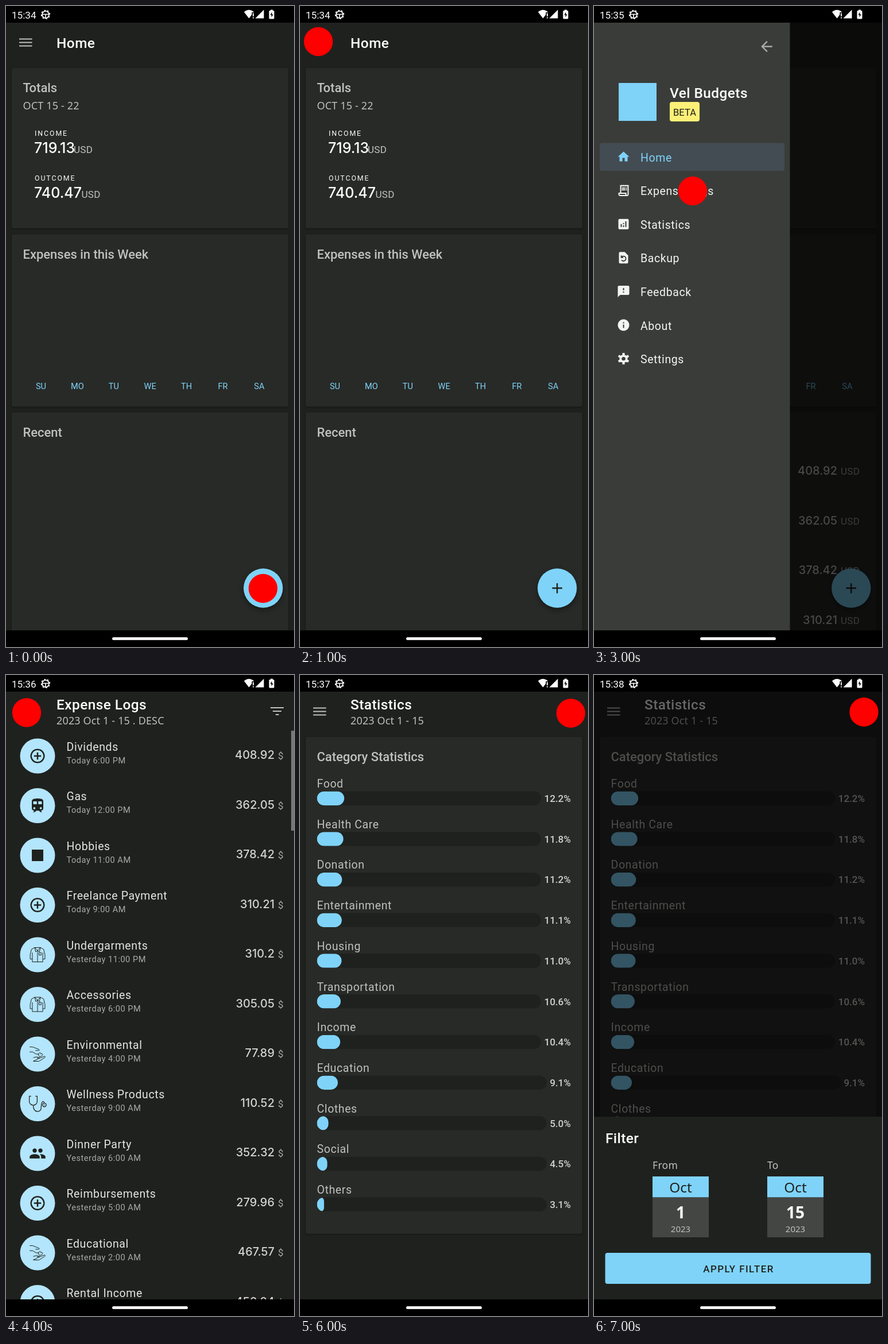
An HTML page with a canvas that plays this animation: 502x1116 px, repeating every 8 s.

```html
<!DOCTYPE html>
<html lang="en">
<head>
<meta charset="utf-8">
<style>
  html, body { margin: 0; width: 100%; height: 100%; overflow: hidden; background: #000; }
  canvas { display: block; }
</style>
</head>
<body>
<canvas id="stage" width="502" height="1116"></canvas>
<script>
const ctx = document.getElementById('stage').getContext('2d');
const BG = '#1f211e', CARD = '#282a27', DRAWER = '#3a3c39', BLUE = '#7fd3f9', PALE = '#b3e5fc';
const WHITE = '#fff', SOFT = '#e4e5e2', GREY = '#c0c1be', DIM = '#a9aaa7';

// Text styles: font and letter spacing
const roboto = (px, weight = 400) => `${weight} ${px}px Roboto, sans-serif`;
const noto = (px, weight = 400) => `${weight} ${px}px "Noto Sans", sans-serif`;
const inter = px => `500 ${px}px Inter, sans-serif`;
const STYLE = {
  clock: [roboto(17.1), 0],
  title: [roboto(24.4, 500), 0.45],
  heading: [roboto(22, 500), -0.03],
  body: [roboto(19.5), 0.6],
  caption: [roboto(14.6), 0.5],
  day: [roboto(14.6), 0],
  unit: [roboto(17.1), 0.2],
  overline: [roboto(12.4), 1.9],
  percent: [roboto(17, 500), 0],
  button: [roboto(17, 500), 1.4],
  badge: [roboto(16.6), 0],
  range: [noto(18), 0.15],
  label: [noto(17.5), 0.3],
  month: [noto(24.4), 0],
  date: [noto(28, 700), 0],
  year: [noto(15), 0],
  total: [inter(25), 0],
  amount: [inter(20), 0]
};

// 24-unit icons: f = filled path, s = stroked path, w = line width
const ICONS = {
  plus: { s: 'M12 3a9 9 0 1 0 .01 0zM12 7v10M7 12h10', w: 2 },
  train: { f: 'M12 2C8 2 4 2.5 4 6v9.5A3.5 3.5 0 0 0 7.5 19L6 20.5v.5h2.2l2-2H14l2 2h2v-.5L16.5 19a3.5 3.5 0 0 0 3.5-3.5V6c0-3.5-3.58-4-8-4zM7.5 17a1.5 1.5 0 1 1 .01 0zM11 10H6V6h5zM16.5 17a1.5 1.5 0 1 1 .01 0zM18 10h-5V6h5z' },
  square: { f: 'M4 4h16v16H4z' },
  jacket: { s: 'M8 2L3.5 4.5 1.7 12v6h3v4h14.6v-4h3v-6L20.5 4.5 16 2H8l4 4 4-4M12 6v16M4.7 18V9M19.3 18V9M14 9h3v3.5h-3zM12 6L9.5 8 8 2M12 6l2.5 2L16 2', w: 0.8 },
  hands: { s: 'M1 2h4l9 3.5c1 .7.5 1.5-.5 1.5H9M1 9h4l5 3h4M14 11c1-2 3-1 2.5 1 1.5-1.5 3.5 0 2 2L15 16l-2-3zM6 17l5-1.2 4 1.7h-4M15 17.5l7-2.5c1.2.5.5 1.7-.5 2.2L14 22H6z', w: 0.8 },
  stethoscope: { s: 'M3 1.5H.5v7a5.5 5.5 0 0 0 11 0v-7H9M6 14c0 12 11 10 11 4 0-7 2-12 4.5-7.5M21.5 11a2.6 2.6 0 1 0 .01 0zM21.5 13v1.4', w: 1 },
  people: { f: 'M16 11a3 3 0 1 0-.01 0zM8 11a3 3 0 1 0-.01 0zM8 13c-2.33 0-7 1.17-7 3.5V19h14v-2.5c0-2.33-4.67-3.5-7-3.5zM16 13l-1 .05c1.2.85 2 2 2 3.45V19h6v-2.5c0-2.33-4.67-3.5-7-3.5z' },
  home: { f: 'M10 20v-6h4v6h5v-8h3L12 3 2 12h3v8z' },
  receipt: { f: 'M19.5 3.5L18 2l-1.5 1.5L15 2l-1.5 1.5L12 2l-1.5 1.5L9 2 7.5 3.5 6 2v14H3v3c0 1.66 1.34 3 3 3h12c1.66 0 3-1.34 3-3V2zM15 20H6c-.55 0-1-.45-1-1v-1h10zM19 19c0 .55-.45 1-1 1s-1-.45-1-1v-3H8V5h11zM9 7h6v2H9zM16 7h2v2h-2zM9 10h6v2H9zM16 10h2v2h-2z' },
  chart: { f: 'M19 3H5a2 2 0 0 0-2 2v14a2 2 0 0 0 2 2h14a2 2 0 0 0 2-2V5a2 2 0 0 0-2-2zM9 17H7v-5h2zM13 17h-2v-3h2zM13 12h-2v-2h2zM17 17h-2V7h2z' },
  backup: { f: 'M14 2H6a2 2 0 0 0-2 2v16c0 1.1.9 2 2 2h12a2 2 0 0 0 2-2V8z', cut: 'M8.5 16a4.2 4.2 0 1 0 0-5M8 8v3.5h3.5', w: 1.8 },
  feedback: { f: 'M20 2H4a2 2 0 0 0-2 2v18l4-4h14a2 2 0 0 0 2-2V4a2 2 0 0 0-2-2zM13 14h-2v-2h2zM13 10h-2V6h2z' },
  info: { f: 'M12 2a10 10 0 1 0 .01 0zM13 17h-2v-6h2zM13 9h-2V7h2z' },
  gear: { s: 'M12 7a5 5 0 1 0 .01 0zM12 2v5M12 17v5M3.3 7l4.4 2.5M16.3 14.5l4.4 2.5M3.3 17l4.4-2.5M16.3 9.5L20.7 7', w: 4 },
  back: { f: 'M20 11H7.83l5.59-5.59L12 4l-8 8 8 8 1.41-1.41L7.83 13H20z' }
};

const ENTRIES = [
  ['Dividends', 'Today 6:00 PM', '408.92', 'plus'],
  ['Gas', 'Today 12:00 PM', '362.05', 'train'],
  ['Hobbies', 'Today 11:00 AM', '378.42', 'square'],
  ['Freelance Payment', 'Today 9:00 AM', '310.21', 'plus'],
  ['Undergarments', 'Yesterday 11:00 PM', '310.2', 'jacket'],
  ['Accessories', 'Yesterday 6:00 PM', '305.05', 'jacket'],
  ['Environmental', 'Yesterday 4:00 PM', '77.89', 'hands'],
  ['Wellness Products', 'Yesterday 9:00 AM', '110.52', 'stethoscope'],
  ['Dinner Party', 'Yesterday 6:00 AM', '352.32', 'people'],
  ['Reimbursements', 'Yesterday 5:00 AM', '279.96', 'plus'],
  ['Educational', 'Yesterday 2:00 AM', '467.57', 'hands'],
  ['Rental Income', 'Yesterday 1:00 AM', '456.24', 'plus']
];
const SHARES = [
  ['Food', 12.2], ['Health Care', 11.8], ['Donation', 11.2], ['Entertainment', 11.1],
  ['Housing', 11], ['Transportation', 10.6], ['Income', 10.4], ['Education', 9.1],
  ['Clothes', 5], ['Social', 4.5], ['Others', 3.1]
];
const MENU = [
  ['Home', 'home'], ['Expense Logs', 'receipt'], ['Statistics', 'chart'], ['Backup', 'backup'],
  ['Feedback', 'feedback'], ['About', 'info'], ['Settings', 'gear']
];

function text(str, x, y, style, color = GREY, align = 'left') {
  const [font, spacing] = STYLE[style];
  ctx.font = font;
  ctx.letterSpacing = spacing + 'px';
  ctx.textAlign = align;
  ctx.fillStyle = color;
  ctx.fillText(str, x, y);
}

function box(x, y, w, h, color, r = 0) {
  ctx.fillStyle = color;
  ctx.beginPath();
  ctx.roundRect(x, y, w, h, r);
  ctx.fill();
}

function disc(x, y, r, color) {
  ctx.fillStyle = color;
  ctx.beginPath();
  ctx.arc(x, y, r, 0, 7);
  ctx.fill();
}

function stroke(d, color, width) {
  ctx.strokeStyle = color;
  ctx.lineWidth = width;
  ctx.stroke(new Path2D(d));
}

function fill(d, color) {
  ctx.fillStyle = color;
  ctx.fill(new Path2D(d), 'evenodd');
}

function icon(name, x, y, scale, color) {
  const { f, s, cut, w } = ICONS[name];
  ctx.save();
  ctx.translate(x, y);
  ctx.scale(scale, scale);
  ctx.translate(-12, -12);
  if (f) fill(f, color);
  if (s) stroke(s, color, w);
  if (cut) stroke(cut, DRAWER, w);
  ctx.restore();
}

function shadowed(blur, drop, draw) {
  ctx.save();
  ctx.shadowColor = 'rgba(0,0,0,.4)';
  ctx.shadowBlur = blur;
  ctx.shadowOffsetY = drop;
  draw();
  ctx.restore();
}

const card = (y, h) => shadowed(3, 1, () => box(10, y, 482, h, CARD, 3));
const shade = alpha => box(0, 29, 502, 1058, `rgba(0,0,0,${alpha})`);

function header(title, subtitle, filter) {
  stroke('M23 57.5h22.5M23 63.5h22.5M23 69.5h22.5', GREY, 2.2);
  text(title, 88, subtitle ? 60 : 73, 'title', WHITE);
  if (subtitle) text(subtitle, 88, 86, 'range');
  if (filter) stroke('M461 57h23M465 63h15M470 69h5.5', GREY, 2.2);
}

function entry([name, when, amount, glyph], y, o) {
  disc(o.cx, y, o.r, PALE);
  icon(glyph, o.cx, y, o.scale, BG);
  text(name, o.x, y - 2 - o.lift, 'body', o.color);
  text(when, o.x, y + 20 - o.lift, 'caption', o.sub);
  text(amount, o.right, y + 7 - o.lift / 4, 'amount', '#d2d3d0', 'right');
  text(o.unit, o.right + 6, y + 7 - o.lift / 4, 'unit', DIM);
}
const RECENT = { cx: 72.5, r: 33.5, scale: 1.5, x: 126, lift: 0, right: 424, unit: 'USD', color: GREY, sub: GREY };
const LOG = { cx: 55, r: 30.5, scale: 1.25, x: 105.5, lift: 7.5, right: 468, unit: '$', color: SOFT, sub: DIM };

function home(loaded) {
  header('Home');
  card(108, 279);
  text('Totals', 29.5, 150, 'heading');
  text('OCT 15 - 22', 29.5, 180, 'range');
  text('INCOME', 50, 225.5, 'overline', WHITE);
  text('719.13', 49, 256, 'total', WHITE);
  text('USD', 118, 256, 'unit');
  text('OUTCOME', 50, 303.5, 'overline', WHITE);
  text('740.47', 49, 334, 'total', WHITE);
  text('USD', 131.5, 334, 'unit');

  card(397.5, 300);
  text('Expenses in this Week', 29.5, 440, 'heading');
  ['SU', 'MO', 'TU', 'WE', 'TH', 'FR', 'SA'].forEach((day, i) =>
    text(day, 61 + i * 63.4, 667, 'day', BLUE, 'center'));

  card(707.5, 400);
  text('Recent', 29.5, 750, 'heading');
  if (loaded) {
    text('OCT 15 - 22', 29.5, 470, 'range');
    disc(61, 497, 2.5, BLUE);
    ctx.setLineDash([2.5, 3.6]);
    stroke('M61 501V637', BLUE, 1.2);
    ctx.setLineDash([]);
    ENTRIES.slice(0, 4).forEach((e, i) => entry(e, 809 + i * 86.5, RECENT));
  }
  shadowed(9, 4, () => disc(448.3, 1013.5, 34.2, BLUE));
  stroke('M439.5 1013.5h17.5M448.2 1005v17.5', BG, 2.4);
}

function logs(scrollbar) {
  header('Expense Logs', '2023 Oct 1 - 15 . DESC', true);
  ENTRIES.forEach((e, i) => entry(e, 141 + i * 86.5, LOG));
  if (scrollbar) box(497, 97, 5, 174, '#777876');
}

function statistics() {
  header('Statistics', '2023 Oct 1 - 15', true);
  card(108, 865);
  text('Category Statistics', 29.5, 150, 'heading');
  SHARES.forEach(([name, share], i) => {
    const y = 202.5 + i * 70.7, width = share < 10 ? 400.5 : 390.5;
    text(name, 29.5, y - 6.5, 'body');
    box(29.5, y, width, 24.5, BG, 12.2);
    ctx.save();
    ctx.clip();
    box(29.5, y, width * share / 100, 24.5, BLUE, 12.2);
    ctx.restore();
    text(share.toFixed(1) + '%', 472, y + 18.5, 'percent', '#d2d3d0', 'right');
  });
}

function drawer(active) {
  shade(0.66);
  box(0, 29, 341.5, 1058, DRAWER);
  icon('back', 301, 70.5, 1.22, DIM);
  box(43, 134, 66, 66, BLUE);
  text('Vel Budgets', 132, 160, 'title', WHITE);
  box(132, 167, 52, 34, '#fdf077', 4);
  text('BETA', 158, 190.5, 'badge', BG, 'center');
  MENU.forEach(([name, glyph], i) => {
    const y = 262.5 + i * 58.6, on = i === active;
    if (on) box(10, y - 24, 322, 48.5, '#434c52', 4);
    icon(glyph, 51.5, y, 1, on ? BLUE : '#f4f5f2');
    if (glyph === 'gear') disc(51.5, y, 3.2, DRAWER);
    text(name, 81, y + 8, 'body', on ? BLUE : '#f4f5f2');
  });
}

function filterSheet() {
  shade(0.6);
  box(0, 769, 502, 318, BG);
  text('Filter', 20, 815, 'title', WHITE);
  [['From', '1', 102], ['To', '15', 302]].forEach(([label, day, x]) => {
    text(label, x, 860, 'label');
    box(x, 873, 98, 36.5, BLUE);
    box(x, 909.5, 98, 69.5, '#444643');
    text('Oct', x + 49, 901, 'month', BG, 'center');
    text(day, x + 49, 946, 'date', WHITE, 'center');
    text('2023', x + 49, 970, 'year', GREY, 'center');
  });
  box(19.5, 1006, 463, 54, BLUE, 4);
  text('APPLY FILTER', 252, 1040, 'button', BG, 'center');
}

function systemBars(minute) {
  box(0, 0, 502, 29, '#000');
  box(0, 1087, 502, 29, '#000');
  box(185, 1099, 132, 5, '#f2f2f2', 2.5);
  text('15:' + minute, 10, 21.5, 'clock', WHITE);
  stroke('M69 9a6 6 0 1 0 .01 0zM63 14.5h12M69 15v6', WHITE, 1.6);
  ctx.setLineDash([2.6, 3.1]);
  stroke('M69 7.6a7.3 7.3 0 1 0 .01 0z', WHITE, 1.8);
  ctx.setLineDash([]);
  fill('M415 10.5Q423.5 3 432 10.5L423.5 21.5z', WHITE);
  box(428.5, 11, 5, 12, '#000');
  stroke('M431 12.5v5.5M431 19.5v2', WHITE, 1.8);
  fill('M434.5 21.5h15v-15z', WHITE);
  box(458.5, 8, 9, 14.5, WHITE, 1.5);
  box(461, 6.5, 4, 2, WHITE);
  fill('M463.5 10.5l-3 5h2.2v4.2l3-5.2h-2.2z', '#000');
}

// One scene per second: clock minute, touch point, layers
const SCENES = [
  [34, 448, 1014, () => home(false)],
  [34, 32, 62, () => home(false)],
  [35, 34.5, 65.5, () => home(true)],
  [35, 172, 322, () => { home(true); drawer(0); }],
  [36, 36, 65.5, () => logs(true)],
  [36, 172.3, 383, () => { logs(false); drawer(1); }],
  [37, 472, 66.5, statistics],
  [38, 470.5, 64.5, () => { statistics(); filterSheet(); }]
];

function frame() {
  const [minute, x, y, draw] = SCENES[Math.floor(performance.now() / 1000) % SCENES.length];
  box(0, 0, 502, 1116, BG);
  draw();
  disc(x, y, 25.2, '#f00');
  systemBars(minute);
  requestAnimationFrame(frame);
}
frame();
</script>
</body>
</html>
```
